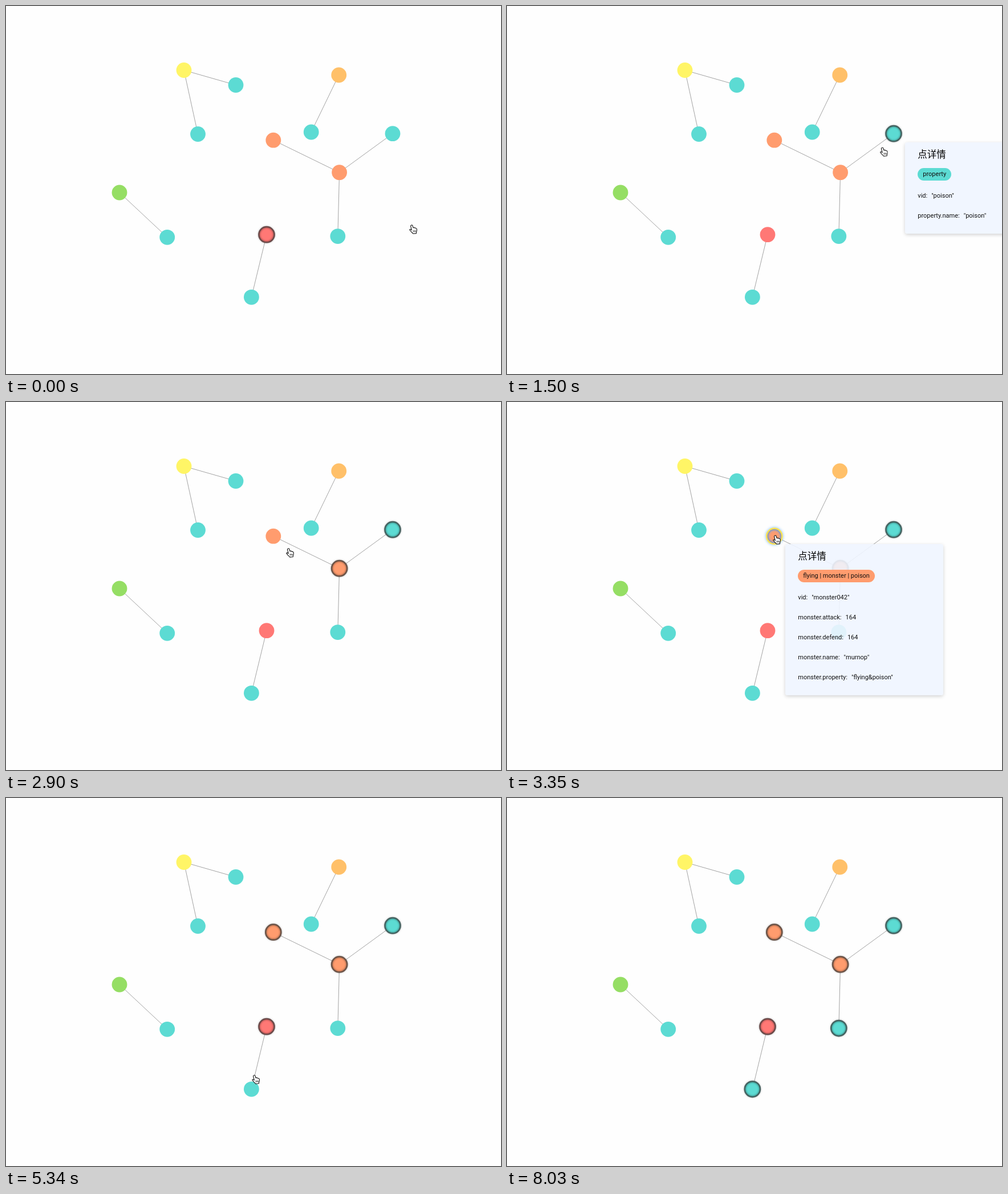
Recreate the animation shown at these times as an HTML page. Size 868 by 645 pixels, loop 9.47 s.

```html
<!DOCTYPE html>
<html lang="zh">
<head>
<meta charset="utf-8">
<title>Graph selection</title>
<style>
  html, body { margin: 0; width: 100%; height: 100%; overflow: hidden; background: #fefefe; }
  #stage { position: relative; width: 100%; height: 100%; overflow: hidden; contain: strict; }
  svg { position: absolute; left: 0; top: 0; }
  .edge { stroke: #a3a3a3; stroke-width: 1; }
  .node circle { fill: var(--tone); }
  .node .ring { display: none; }
  .selected .ring {
    display: block; stroke: color-mix(in srgb, var(--tone) 25%, #3a3a3a); stroke-width: 2.5;
    filter: drop-shadow(0 0 1.5px rgba(0, 0, 0, .3));
  }
  .selected .ring { fill: url(#shade); }
  .hover .ring {
    display: block; fill: url(#tint); stroke: #ffe34f; stroke-width: 2.5;
    filter: drop-shadow(0 0 2.5px #69b1f0);
  }
  .panel {
    position: absolute; box-sizing: border-box; width: 276.5px; padding: 0 22.3px; visibility: hidden;
    background: rgba(240, 245, 255, .9); border-radius: 4px; box-shadow: 0 2px 6px rgba(0, 0, 0, .18);
    font: 11px/35px Roboto, sans-serif; color: #111; white-space: nowrap;
  }
  .panel h1 { margin: 0; height: 45px; font: 500 16.5px/40px "Noto Sans CJK SC", "Noto Sans CJK", sans-serif; color: #000; }
  .panel .tag { display: block; width: max-content; height: 22px; margin-bottom: 9px; padding: 0 9px; border-radius: 11px; line-height: 22px; }
  .panel .row { height: 35px; }
  .panel .row span { margin-left: 7px; }
  .panel::after { content: ""; display: block; height: 14px; }
</style>
</head>
<body>
<div id="stage">
  <svg id="graph" width="868" height="645"></svg>
  <div id="panels"></div>
  <svg id="cursor" width="14" height="17" fill="#fff" stroke="#111" stroke-width="1.1" stroke-linejoin="round">
    <path d="M3.6 1.2C4.6 .5 5.7 1 6 2L7 5.6C7.6 5 8.8 5.1 9.2 5.9C10 5.4 11 5.7 11.4 6.6C12.3 6.4 13.1 7 13.3 8C13.6 10 13.6 11 12.6 13L12.4 15.6L6.8 16C6 14.5 3.5 13 2.2 11C1 9.7 .6 9 1.2 8.5C2 8 3.2 8.6 4.3 9.8L2.7 3C2.5 2.2 2.9 1.5 3.6 1.2Z"/>
    <path d="M7.3 10.2v3M9.2 10.2v3M11 10.2v3" stroke-width=".8"/>
  </svg>
</div>
<script>
const LOOP = 9470;
const tones = { yellow: '#fff566', amber: '#ffc069', orange: '#ff9c6e', teal: '#5cdbd3', green: '#95de64', red: '#ff7875' };

const nodes = {
  a: [312, 112.5, 'yellow'], b: [403, 138.5, 'teal'], c: [336.5, 224.5, 'teal'],
  d: [583.7, 121, 'amber'], e: [535.2, 221, 'teal'],
  f: [468.8, 235.2, 'orange'], g: [584.6, 291.7, 'orange'], h: [678, 223.7, 'teal'], i: [581.8, 403.6, 'teal'],
  j: [199, 327, 'green'], k: [282.7, 405.3, 'teal'],
  l: [457, 400.7, 'red'], m: [430.4, 510.3, 'teal']
};
const edges = ['ab', 'ac', 'de', 'fg', 'gh', 'gi', 'jk', 'lm'];

const property = name => ({ tag: 'property', rows: { vid: `"${name}"`, 'property.name': `"${name}"` } });
const monster = (tag, vid, attack, defend, name, kind) => ({
  tag,
  rows: {
    vid: `"monster${vid}"`, 'monster.attack': attack, 'monster.defend': defend,
    'monster.name': `"${name}"`, 'monster.property': `"${kind}"`
  }
});

// enter / select / leave times in ms, panel corner, panel content
const visits = [
  { id: 'h', enter: 690, select: 1100, leave: 1450, at: [698, 239], info: property('poison') },
  { id: 'g', enter: 1800, select: 2270, leave: 2720, at: [602, 306], info: monster('flying | monster | poison', '041', 85, 76, 'tasbin', 'flying&amp;poison') },
  { id: 'f', enter: 3010, select: 3470, leave: 3790, at: [488, 249], info: monster('flying | monster | poison', '042', 164, 164, 'murnop', 'flying&amp;poison') },
  { id: 'l', enter: 4400, select: 4630, leave: 4920, at: [470, 428.5], info: monster('electric | monster', '026', 200, 154, 'velodi', 'electric') },
  { id: 'm', enter: 5420, select: 5600, leave: 5930, at: [449, 525], info: property('electric') },
  { id: 'i', enter: 6280, select: 6680, leave: 6630, at: [600, 426], info: property('flying') }
];
const HIDE_DELAY = 110;

// time, x, y of the pointer
const path = [
  [0, 707, 383], [60, 707, 383], [400, 690, 290], [780, 676, 224],
  [1420, 676, 224], [1500, 654, 247], [1700, 604, 284], [1900, 580, 290],
  [2660, 580, 290], [2780, 535, 277], [2900, 491, 256], [3100, 466, 233],
  [3710, 466, 233], [4000, 462, 310], [4300, 456, 385], [4450, 451, 405],
  [4860, 451, 405], [5100, 440, 450], [5500, 425, 508],
  [5870, 425, 508], [6100, 510, 450], [6340, 578, 409],
  [7150, 578, 409], [7320, 782, 525], [7680, 782, 525], [8030, 826, 648], [LOOP, 826, 648]
];

const byId = id => document.getElementById(id);
const cursor = byId('cursor');

const rim = (id, color, opacity) => `<radialGradient id="${id}">
  <stop offset=".65" stop-color="${color}" stop-opacity="0"/>
  <stop offset="1" stop-color="${color}" stop-opacity="${opacity}"/></radialGradient>`;

byId('graph').innerHTML = `<defs>${rim('shade', '#000', .15)}${rim('tint', '#4a86d8', .7)}</defs>` +
  edges.map(([from, to]) => {
    const [x1, y1] = nodes[from], [x2, y2] = nodes[to];
    return `<line class="edge" x1="${x1}" y1="${y1}" x2="${x2}" y2="${y2}"/>`;
  }).join('') +
  Object.entries(nodes).map(([id, [x, y, tone]]) =>
    `<g id="node-${id}" class="node" style="--tone:${tones[tone]}" transform="translate(${x} ${y})">
      <circle r="13.4"/><circle class="ring" r="13.6"/></g>`).join('');

byId('panels').innerHTML = visits.map(({ id, at, info }) =>
  `<div id="panel-${id}" class="panel" style="left:${at[0]}px;top:${at[1]}px">
    <h1>点详情</h1><span class="tag" style="background:${tones[nodes[id][2]]}">${info.tag}</span>
    ${Object.entries(info.rows).map(([key, value]) =>
      `<div class="row">${key}:<span>${value}</span></div>`).join('')}
  </div>`).join('');

function cursorAt(t) {
  const next = path.findIndex(p => p[0] > t);
  const [t0, x0, y0] = path[next - 1], [t1, x1, y1] = path[next];
  const k = (t - t0) / (t1 - t0);
  return [x0 + (x1 - x0) * k, y0 + (y1 - y0) * k];
}

function render(now) {
  const t = now % LOOP;
  const [x, y] = cursorAt(t);
  cursor.style.transform = `translate(${x}px, ${y}px)`;
  for (const { id, enter, select, leave } of visits) {
    const selected = t >= select || (id === 'l' && t < visits[0].select);
    const hover = t >= enter && t < select;
    byId('node-' + id).setAttribute('class', 'node' + (selected ? ' selected' : hover ? ' hover' : ''));
    byId('panel-' + id).style.visibility = t >= enter && t < leave + HIDE_DELAY ? 'visible' : 'hidden';
  }
}

const start = performance.now();
function tick() {
  render(Math.max(0, performance.now() - start));
  requestAnimationFrame(tick);
}
tick();
</script>
</body>
</html>
```
